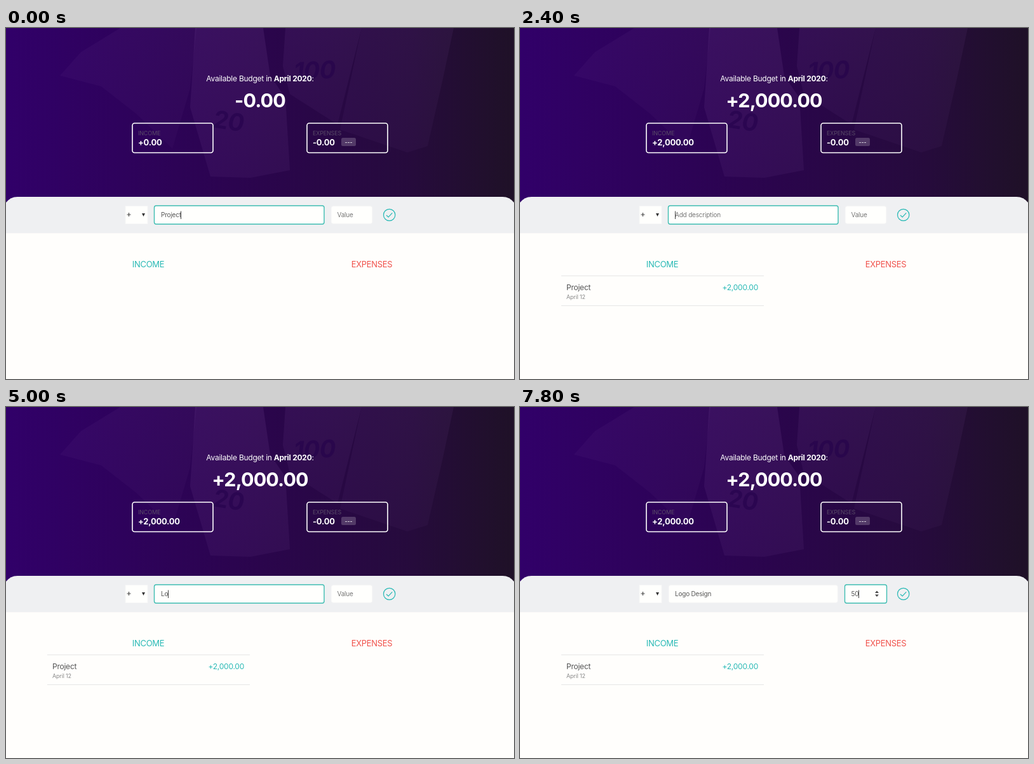
An HTML page for the animation above (8000 ms loop, 800 px wide and 553 px high).

```html
<!DOCTYPE html>
<html lang="en">
<head>
<meta charset="utf-8">
<title>Budget</title>
<style>
  html, body { margin: 0; width: 100%; height: 100%; overflow: hidden; background: #fffefc; }
  svg { display: block; width: 800px; height: 553px; }
  text { font-family: Inter, "Open Sans", sans-serif; letter-spacing: -.02em; white-space: pre; }
  .mid { text-anchor: middle; }
  .end { text-anchor: end; }
  .bold { font-weight: 700; }
  .white { fill: #fff; }
  .teal { fill: #28b9b5; }
  .red { fill: #f0524c; }
  .head { font-size: 13px; letter-spacing: -.025em; text-anchor: middle; }
  .label { font-size: 9px; fill: #584a68; }
  .input { font-size: 10px; fill: #555; }
  .hint { fill: #777; }
  .field { fill: #fffffd; stroke: #f6f6f6; stroke-width: 1; }
  .focus { stroke: #3fbdb2; stroke-width: 1.4; }
  .card { fill: none; stroke: #fff; stroke-width: 1.6; }
  .mark { fill: none; stroke: #28b9b5; stroke-width: 1.2; }
  .rule { stroke: #e6e6e6; }
  .note { fill: #22004a; fill-opacity: .55; font-weight: 700; }
</style>
</head>
<body>
<svg viewBox="0 0 800 553">
  <defs>
    <linearGradient id="bg">
      <stop offset="0" stop-color="#310069"/>
      <stop offset=".45" stop-color="#2b044f"/>
      <stop offset=".8" stop-color="#260b3c"/>
      <stop offset="1" stop-color="#1f1127"/>
    </linearGradient>
    <linearGradient id="shade" x2="0" y2="1">
      <stop offset="0" stop-color="#8050a0" stop-opacity=".17"/>
      <stop offset="1" stop-color="#8050a0" stop-opacity=".1"/>
    </linearGradient>
  </defs>
  <rect width="800" height="290" fill="url(#bg)"/>

  <!-- banknotes -->
  <g fill="url(#shade)">
    <path d="M85 75L118 38L180 0H300L290 95L262 190L205 135L150 92Z" opacity=".5"/>
    <path d="M298 0H405L416 75L440 110L447 224L385 236L322 234L290 125Z"/>
    <path d="M440 0H560L522 152L447 104L436 60Z" opacity=".75"/>
    <path d="M560 0H705L688 80L664 186L632 196L526 160Z" opacity=".6"/>
  </g>
  <text class="note" font-size="38" transform="translate(324 156) rotate(9) skewX(-4)">20</text>
  <text class="note" font-size="38" transform="translate(452 82) rotate(-3) skewX(-10)">100</text>

  <text class="mid white" x="400" y="84" font-size="12">Available Budget in <tspan class="bold">April 2020</tspan>:</text>
  <text class="mid bold white" id="total" x="400" y="125" font-size="30.5" style="letter-spacing:-.03em"></text>

  <rect class="card" x="199" y="150" width="127" height="46.5" rx="3.5"/>
  <text class="label" x="208" y="169">INCOME</text>
  <text class="bold white" id="income" x="208" y="184.5" font-size="13"></text>

  <rect class="card" x="474" y="150" width="127" height="46.5" rx="3.5"/>
  <text class="label" x="483" y="169">EXPENSES</text>
  <text class="bold white" x="483" y="184.5" font-size="13">-0.00</text>
  <rect x="528" y="173" width="23" height="13" rx="2.5" fill="#fff" fill-opacity=".2"/>
  <text class="mid white" x="539.5" y="182.5" font-size="9">---</text>

  <!-- entry bar -->
  <path d="M0 323.5V275Q7 266 18 266H782Q793 266 800 275V323.5Z" fill="#eff0f2"/>
  <rect y="323.5" width="800" height="230" fill="#fffefc"/>
  <rect class="field" x="188" y="280.5" width="35" height="28"/>
  <path d="M190.5 294H196.5M193.5 291V297" stroke="#444" stroke-width="1.1"/>
  <path d="M214 292H219L216.500 297Z" fill="#333"/>
  <rect id="descBox" rx="3"/>
  <rect id="valueBox" rx="3"/>
  <text id="desc" x="244" y="298"></text>
  <text id="value" x="521.500" y="298"></text>
  <path id="spin" d="M559 293L562 289.500L565 293ZM559 295.500L562 299L565 295.500Z" fill="#444"/>
  <path id="caret" d="M0 288.500V301" stroke="#444"/>
  <circle class="mark" cx="603.7" cy="294.5" r="9.2"/>
  <path class="mark" d="M599 295L602.200 298L608.300 291.300"/>

  <text class="head teal" x="224" y="376.5">INCOME</text>
  <text class="head red" x="576" y="376.5">EXPENSES</text>
  <g id="item">
    <path class="rule" d="M65 390.500H384M65 437.500H384"/>
    <text x="73" y="413" font-size="12" fill="#555">Project</text>
    <text x="73" y="427" font-size="9" fill="#8c8c8c">April 12</text>
    <text class="end teal" x="375" y="413" font-size="12">+2,000.00</text>
  </g>
</svg>
<script>
const LOOP = 8000, SUBMIT = 2400;
const $ = id => document.getElementById(id);
const hints = { desc: "Add description", value: "Value" };
const boxes = { desc: [233.5, 267.5], value: [511.5, 66] };

// Each step: time, focused field, description, value
const steps = [
  [0, "desc", "Project", ""],
  [300, "desc", "Project", ""],
  [1200, "value", "Project", ""]
];
const type = (start, gap, text, step) => {
  for (let i = 1; i <= text.length; i++)
    steps.push([start + gap * (i - 1), ...step(text.slice(0, i))]);
};
type(1700, 100, "2000", s => ["value", "Project", s]);
steps.push([SUBMIT, "desc", "", ""]);
type(4800, 140, "Logo Design", s => ["desc", s, ""]);
steps.push([7200, "value", "Logo Design", ""]);
type(7600, 200, "50", s => ["value", "Logo Design", s]);

function setField(id, text, focused) {
  const el = $(id), box = $(id + "Box"), [x, w] = boxes[id];
  const inset = focused ? 0 : .7;
  el.textContent = text || hints[id];
  el.setAttribute("class", text ? "input" : "input hint");
  box.setAttribute("class", focused ? "field focus" : "field");
  box.setAttribute("x", x + inset);
  box.setAttribute("y", 280 + inset);
  box.setAttribute("width", w - 2 * inset);
  box.setAttribute("height", 29 - 2 * inset);
}

const show = (id, on) => $(id).style.display = on ? "" : "none";

function draw(t) {
  const [time, focus, desc, value] = steps.filter(s => s[0] <= t).pop();
  const added = t >= SUBMIT;
  setField("desc", desc, focus === "desc");
  setField("value", value, focus === "value");
  show("spin", focus === "value");
  show("item", added);
  $("total").textContent = added ? "+2,000.00" : "-0.00";
  $("income").textContent = added ? "+2,000.00" : "+0.00";

  const el = $(focus), typed = focus === "desc" ? desc : value;
  const x = +el.getAttribute("x") + (typed ? el.getComputedTextLength() : 0);
  $("caret").setAttribute("transform", `translate(${Math.floor(x) + .5} 0)`);
  show("caret", (t - time) % 1000 < 500);
}

const begin = performance.now();
(function tick() {
  draw((performance.now() - begin) % LOOP);
  requestAnimationFrame(tick);
})();
</script>
</body>
</html>
```
